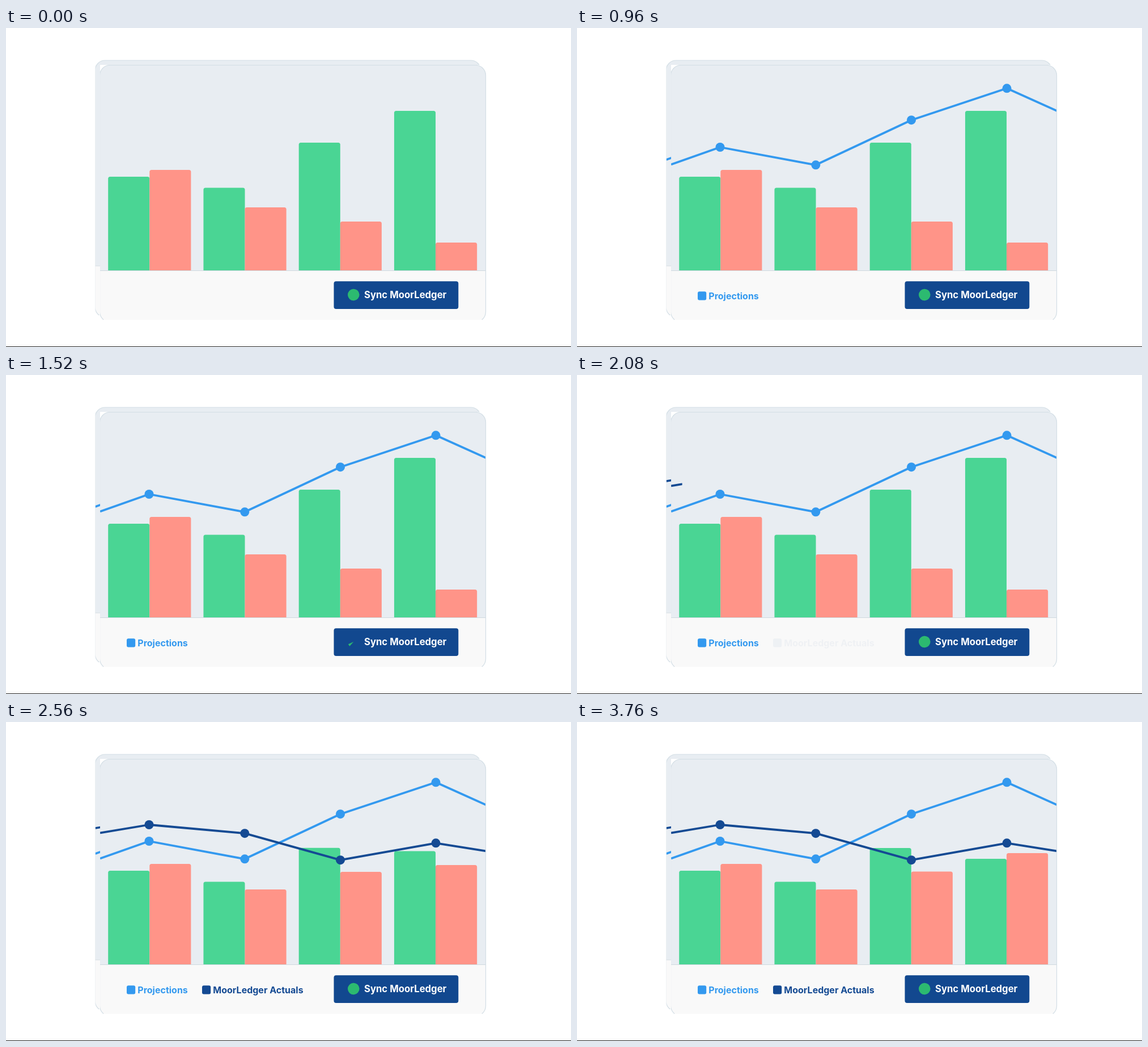
Animation, 997 px wide and 562 px high, one loop 3840 ms. Source, as an HTML page with a canvas:

```html
<!DOCTYPE html>
<html lang="en">
<head>
<meta charset="utf-8">
<title>Projections and actuals</title>
<style>
  html, body { margin: 0; width: 100%; height: 100%; overflow: hidden; background: #fff; }
  canvas { display: block; }
</style>
</head>
<body>
<canvas id="stage" width="997" height="562"></canvas>
<script>
const ctx = document.getElementById('stage').getContext('2d');
const LOOP = 3840, STEP = 80;
const GREEN = '#4ad594', RED = '#ff9488', BLUE = '#3399ef', NAVY = '#144a93';
const BASE = 427, LEFT = 166, RIGHT = 847, TOP = 65, BOTTOM = 514;

// Tops of the green and red bars, before and after the sync.
const groups = [
  { from: [262, 250], to: [262, 250] },
  { from: [281.5, 316], to: [281.5, 295] },
  { from: [202, 341], to: [222, 263.5] },
  { from: [146, 378], to: [241, 231] }
];
const nodeX = [LEFT, 252.5, 421.3, 590, 758.5, RIGHT];
const series = [
  { color: BLUE, ys: [240.5, 210, 241.3, 162.2, 106.3, 146], start: 80, label: 'Projections', x: 213 },
  { color: NAVY, ys: [195.5, 181, 196.2, 243.2, 213.3, 227.3], start: 2020, label: 'MoorLedger Actuals', x: 346 }
];

const progress = (t, start, length) => Math.min(1, Math.max(0, (t - start) / length));
const easeOut = p => 1 - (1 - p) ** 3;
const easeInOut = p => p < 0.5 ? 2 * p * p : 1 - 2 * (1 - p) ** 2;
const mix = (a, b, p) => a + (b - a) * p;

function box(x, y, w, h, radii, color) {
  ctx.beginPath();
  ctx.roundRect(x, y, w, h, radii);
  ctx.fillStyle = color;
  ctx.fill();
}

function text(value, x, y, size, color) {
  ctx.font = `700 ${size}px Inter, "Open Sans", sans-serif`;
  ctx.fillStyle = color;
  ctx.fillText(value, x, y);
}

function clipTo(x, y, w, h, draw) {
  ctx.save();
  ctx.beginPath();
  ctx.rect(x, y, w, h);
  ctx.clip();
  draw();
  ctx.restore();
}

function drawBars(t) {
  groups.forEach(({ from, to }, i) => {
    const p = easeOut(progress(t, 2117 + i * 100, 300));
    [GREEN, RED].forEach((color, k) => {
      const y = mix(from[k], to[k], p);
      box(180.2 + i * 168.25 + k * 73.1, y, 73.1, BASE - y, [3.5, 3.5, 0, 0], color);
    });
  });
}

function drawLine({ color, ys, start }, t) {
  const reach = easeInOut(progress(t, start, 500));
  if (!reach) return;
  const tip = mix(LEFT, RIGHT, reach);
  clipTo(LEFT, TOP, tip - LEFT, BASE - TOP, () => {
    ctx.beginPath();
    nodeX.forEach((x, i) => ctx.lineTo(x, ys[i]));
    ctx.strokeStyle = color;
    ctx.lineWidth = 3.8;
    ctx.lineJoin = 'round';
    ctx.stroke();
  });
  ctx.fillStyle = color;
  for (let i = 1; i < 5; i++) {
    const scale = Math.min(1, Math.max(0, (tip - nodeX[i] + 8) / 16));
    ctx.beginPath();
    ctx.arc(nodeX[i], ys[i], 8 * scale, 0, 2 * Math.PI);
    ctx.fill();
  }
}

function drawLegend({ color, label, start, x }, t) {
  ctx.globalAlpha = progress(t, start + 50, 240);
  box(x, 464.3, 15.2, 15.2, 3, color);
  text(label, x + 19.3, 477.6, 16, color);
  ctx.globalAlpha = 1;
}

function drawButton(t) {
  box(578.5, 446.3, 219.8, 48.8, 4, '#12488f');
  text('Sync MoorLedger', 632, 476.2, 16.7, '#fff');
  const sweep = t < 1440 ? 1 : easeInOut(progress(t, 1440, 440));
  ctx.beginPath();
  ctx.moveTo(613.3, 470);
  ctx.arc(613.3, 470, 10.3, 2.3, 2.3 + sweep * 2 * Math.PI);
  ctx.fillStyle = '#2cba70';
  ctx.fill();
}

function drawCard(t) {
  ctx.save();
  ctx.beginPath();
  ctx.roundRect(165.5, TOP + 0.5, 681, 452.5, 18);
  ctx.clip();
  ctx.fillStyle = '#e8edf2';
  ctx.fillRect(160, 60, 700, BASE - 60);
  ctx.fillStyle = '#f9f9f9';
  ctx.fillRect(160, BASE, 700, 100);
  drawBars(t);
  ctx.fillStyle = '#cfd9df';
  ctx.fillRect(160, BASE, 700, 1);
  series.forEach(s => drawLine(s, t));
  series.forEach(s => drawLegend(s, t));
  drawButton(t);
  ctx.restore();
  ctx.beginPath();
  ctx.roundRect(165.5, TOP + 0.5, 681, 452.5, 18);
  ctx.strokeStyle = '#d3dee5';
  ctx.lineWidth = 1.2;
  ctx.stroke();
}

function render(t) {
  ctx.fillStyle = '#fff';
  ctx.fillRect(0, 0, 997, 562);
  // A shifted copy peeks out above and to the left of the front card.
  clipTo(157.5, 56, 682, 450, () => {
    ctx.translate(-8.5, -8.5);
    drawCard(t);
  });
  clipTo(LEFT, TOP, RIGHT - LEFT + 1, BOTTOM - TOP, () => {
    ctx.fillStyle = '#fff';
    ctx.fillRect(LEFT, TOP, RIGHT - LEFT + 1, BOTTOM - TOP);
    drawCard(t);
  });
  ctx.fillStyle = '#222';
  ctx.fillRect(0, 561, 997, 1);
}

const origin = performance.now();
function tick() {
  const t = (performance.now() - origin) % LOOP;
  render(Math.floor(t / STEP) * STEP);
  requestAnimationFrame(tick);
}
tick();
</script>
</body>
</html>
```
